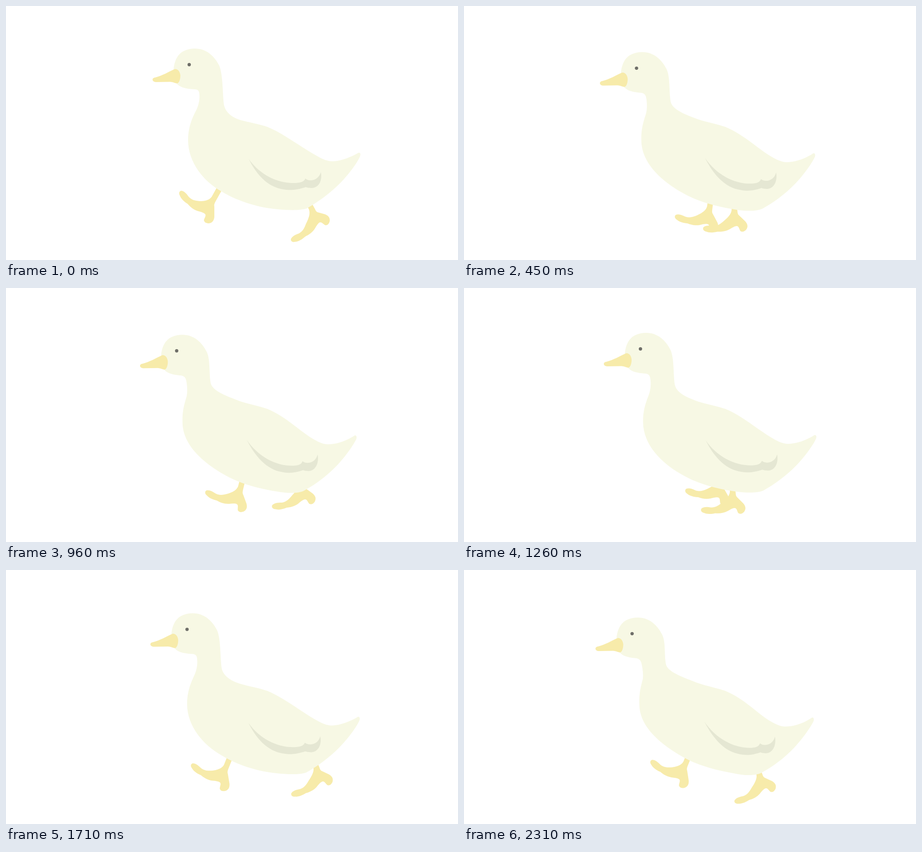
An HTML page for the animation above (2.34 s loop, 998 by 561 pixels).

```html
<!DOCTYPE html>
<html lang="en">
<head>
<meta charset="utf-8">
<title>Walking duck</title>
<style>
  html, body { margin: 0; width: 100%; height: 100%; overflow: hidden; background: #fff; }
  svg { display: block; width: 100%; height: 100%; }
  .skin { fill: #f7ebaa; }
</style>
</head>
<body>
<svg viewBox="0 0 998 561">
  <path id="legA" class="skin"/>
  <path id="legB" class="skin"/>
  <path id="body" fill="#f7f8e4"/>
  <path id="wing" fill="#e5e7d3"/>
  <g id="face">
    <path class="skin" d="M371 140C376 137 384 142 385 153C385 163 382 170 378 171C374 171 370 168 362 167.5L332 168C322 168 321 159 329 158C345 154 360 145 371 140Z"/>
    <circle cx="404.5" cy="129.5" r="3.7" fill="#6f6f69"/>
  </g>
</svg>
<script>
const LOOP = 2340, TICK = 30;
const $ = id => document.getElementById(id);
const mix = (a, b, k) => a + (b - a) * k;

// Each shape has an upright and a stretched pose with matching points.
const BODY = [
  `M370 140 C373 112 385 95 417 94 C442 94 460 110 471 132 C479 152 478 190 481 217
   C485 240 508 249 518 252 C536 257 556 260 577 267 C610 280 652 312 688 332
   C700 339 711 343 720 343 C736 343 755 337 775 326 C780 322 784 324 782 331
   C778 343 757 372 738 391 C716 413 688 434 664 447 C650 452 625 451 600 449
   C560 446 512 432 475 409 C436 387 402 345 402 296 C402 270 410 250 418 234
   C426 220 428 205 427 196 C427 188 424 184 417 184 C395 183 382 179 376 170Z`,
  `M334 152 C337 124 349 107 381 106 C406 106 424 122 435 144 C443 160 439 185 443 207
   C446 224 482 236 515 249 C534 256 556 260 577 267 C620 285 645 315 672 332
   C685 340 697 346 708 346 C724 346 746 341 766 327 C770 324 773 328 771 334
   C765 347 746 374 727 394 C706 416 682 434 656 448 C645 454 622 455 600 450
   C560 443 515 432 480 411 C440 387 386 350 386 296 C385 272 389 258 393 241
   C394 230 391 217 390 211 C388 202 386 198 378 196 C356 194 347 190 340 182Z`
];
const WING = [
  `M536 338 C560 372 598 391 634 391 C648 391 658 389 661 381 C668 388 690 387 695 367
   C699 383 692 401 676 402 C670 402 664 401 662 400 C640 407 625 408 607 404
   C570 396 548 362 536 338Z`,
  `M530 334 C554 371 594 393 630 393 C643 393 650 391 653 383 C660 390 681 388 686 368
   C689 385 683 403 667 405 C661 405 656 404 654 403 C634 410 621 410 604 406
   C567 397 544 361 530 334Z`
];
const LEG = [
  `M485 366 L456 418 C453 425 446 431 428 431 C416 430 410 428 404 422
   C398 414 394 409 387 408 C382 409 381 414 384 419 C386 425 393 432 401 437
   C407 444 414 450 424 453 C432 455 438 457 440 460 C442 464 438 468 437 473
   C438 478 442 480 448 480 C455 479 459 475 460 466 L460 443
   C459 438 461 435 463 431 L496 372Z`,
  `M505 388 L462 428 C456 433 448 435 428 431 C416 430 410 428 404 422
   C398 414 394 409 387 408 C382 409 381 414 384 419 C386 425 393 432 401 437
   C407 444 414 450 424 453 C432 455 438 457 440 460 C442 464 438 468 437 473
   C438 478 442 480 448 480 C455 479 459 475 460 466 L460 450
   C460 447 462 444 465 442 L512 396Z`
];
// Lift of the swinging foot: progress, dx, dy
const LIFT = [[0, 0, 0], [.06, 28, -11], [.12, 35, -15], [.42, 26, -22], [.6, 19, -20], [.88, 5, -6.5], [1, 0, 0]];
// Time and number of half strides
const STRIDE = [[0, 0], [722, 1], [1610, 2], [2340, 2.92]];

function morph([a, b], k) {
  const to = b.match(/[\d.]+/g);
  let i = 0;
  return a.replace(/[\d.]+/g, n => mix(+n, +to[i++], k).toFixed(2));
}

function sample(table, x) {
  const i = Math.max(1, table.findIndex(row => row[0] >= x));
  const a = table[i - 1], b = table[i], k = (x - a[0]) / (b[0] - a[0]);
  return a.slice(1).map((v, j) => mix(v, b[j + 1], k));
}

// p runs from 0 (foot in front) to 1 (foot behind)
function poseLeg(el, p, [dx, dy]) {
  const x = mix(469.8, 627, p) + dx, y = mix(383, 428.5, p) + dy;
  el.setAttribute("d", morph(LEG, p));
  el.setAttribute("transform", `translate(${x} ${y}) rotate(${-74.5 * p}) translate(-469.8 -383)`);
}

function draw(t) {
  const [u] = sample(STRIDE, t);
  const step = Math.floor(u), f = u - step, odd = step % 2;
  const lean = (odd ? 1 - f : f) * 1.05;
  $("body").setAttribute("d", morph(BODY, lean));
  $("wing").setAttribute("d", morph(WING, lean));
  $("face").setAttribute("transform", `translate(${-36 * lean} ${12 * lean})`);
  const legs = [$("legA"), $("legB")];
  poseLeg(legs[odd], f, [0, 0]);
  poseLeg(legs[1 - odd], 1 - f, step ? sample(LIFT, f) : [0, 0]);
}

const start = performance.now();
function frame() {
  const t = (performance.now() - start) % LOOP;
  draw(Math.floor(t / TICK) * TICK);
  requestAnimationFrame(frame);
}
frame();
</script>
</body>
</html>
```
